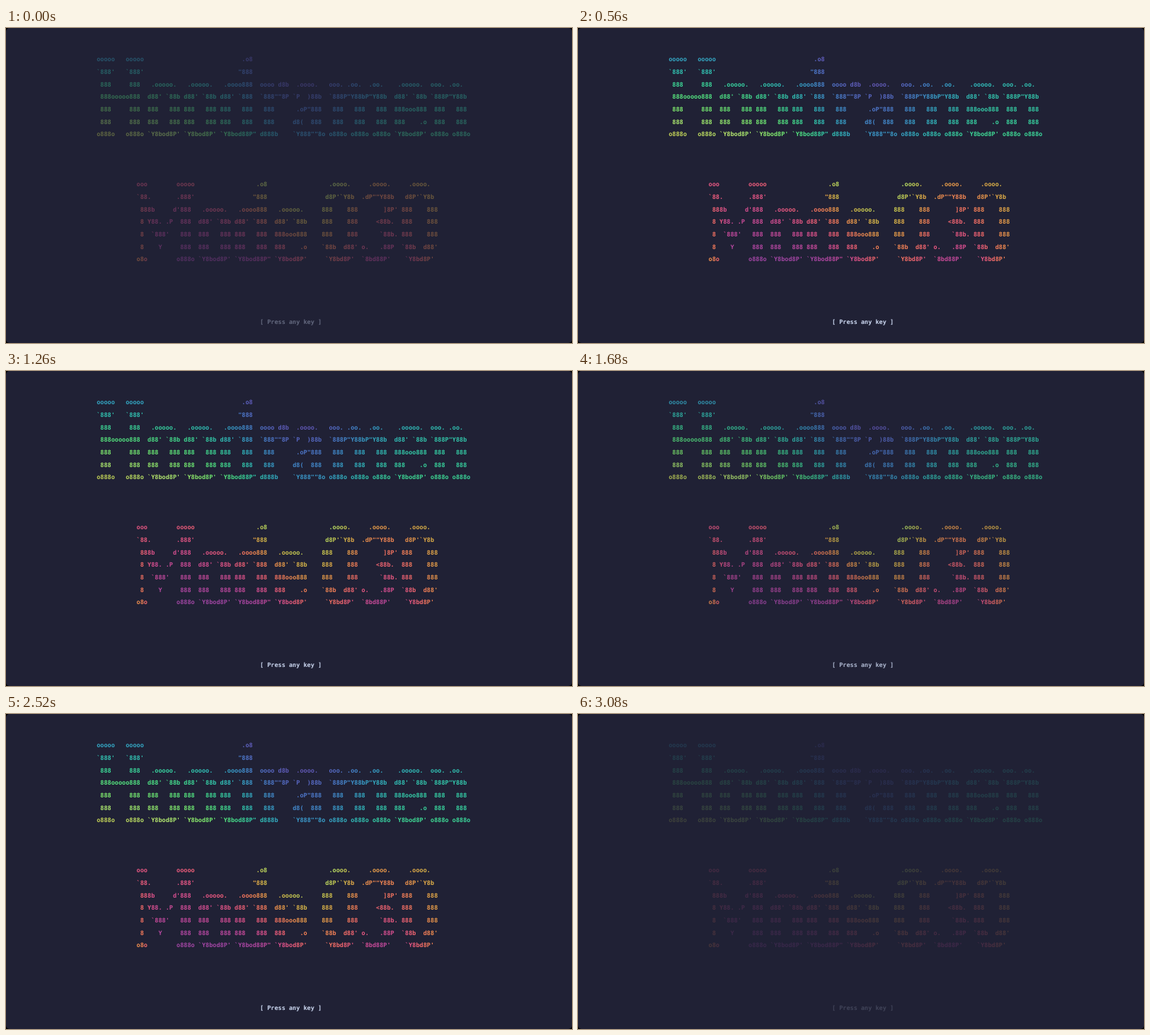
An HTML page that plays this animation: 800x446 px, repeating every 3.15 s.

```html
<!DOCTYPE html>
<html lang="en">
<head>
<meta charset="utf-8">
<title>Title screen</title>
<style>
  html, body { margin: 0; width: 100%; height: 100%; overflow: hidden; background: #000; }
  svg { display: block; width: 800px; height: 446px; background: #202135; border-radius: 5px; }
  text {
    font: bold 8.52px "DejaVu Sans Mono", monospace;
    text-rendering: geometricPrecision;
    white-space: pre;
  }
</style>
</head>
<body>
<svg viewBox="0 0 800 446"><g id="screen"></g></svg>
<script>
const CELL = 800 / 156, ROW = 17.69, TOP = 47.3;
const screen = document.getElementById('screen');

// Banner letters: rows split by "|", "~" stands for a backtick.
const GLYPHS = {
  H: `ooooo   ooooo|~888'   ~888'| 888     888| 888ooooo888| 888     888| 888     888|o888o   o888o`,
  M: `ooo        ooooo|~88.       .888'| 888b     d'888| 8 Y88. .P  888| 8  ~888'   888| 8    Y     888|o8o        o888o`,
  a: `|| .oooo.|~P  )88b| .oP"888|d8(  888|~Y888""8o`,
  d: `      .o8|     "888| .oooo888|d88' ~888|888   888|888   888|~Y8bod88P"`,
  e: `|| .ooooo.|d88' ~88b|888ooo888|888    .o|~Y8bod8P'`,
  m: `||ooo. .oo.  .oo.|~888P"Y88bP"Y88b| 888   888   888| 888   888   888|o888o o888o o888o`,
  n: `||ooo. .oo.|~888P"Y88b| 888   888| 888   888|o888o o888o`,
  o: `|| .ooooo.|d88' ~88b|888   888|888   888|~Y8bod8P'`,
  r: `||oooo d8b|~888""8P| 888| 888|d888b`,
  0: `  .oooo.| d8P'~Y8b|888    888|888    888|888    888|~88b  d88'| ~Y8bd8P'`,
  3: `  .oooo.|.dP""Y88b|      ]8P'|    <88b.|     ~88b.|o.   .88P|~8bd88P'`,
  ' ': '  '
};

const mix = (a, b, k) => a + (b - a) * k;
const bump = (u, center, width) => Math.exp(-(((u - center) / width) ** 2));

// Rainbow position across a banner: u runs left to right, v top to bottom.
function coolTone(u, v) {
  return mix(mix(.79, .45, v), mix(.76, .69, v), u) + .24 * bump(u, .53, .2);
}

function warmTone(u, v) {
  const top = .2 + .35 * bump(u, .53, .22) + .2 * bump(u, 1, .2);
  const bottom = .08 + .25 * bump(u, 0, .04) + .2 * bump(u, .6, .15) + .25 * bump(u, 1, .12);
  return mix(top, bottom, v);
}

// Softened cubehelix rainbow, t from 0 to 1.
function rainbow(t) {
  const d = Math.abs(t - .5), l = .8 - .9 * d, a = (1.2 - 1.2 * d) * l * (1 - l);
  const h = (360 * t + 20) * Math.PI / 180, c = Math.cos(h), s = Math.sin(h);
  const rgb = [-.149 * c + 1.783 * s, -.292 * c - .906 * s, 1.973 * c];
  return `rgb(${rgb.map(v => Math.round(255 * Math.max(0, Math.min(1, l + a * v))))})`;
}

function write(str, col, row, fill) {
  const el = document.createElementNS('http://www.w3.org/2000/svg', 'text');
  el.setAttribute('x', col * CELL);
  el.setAttribute('y', TOP + row * ROW);
  el.setAttribute('fill', fill);
  el.textContent = str;
  screen.append(el);
}

// Sets a word in banner letters, one blank column after each.
function banner(word, col, row, tone) {
  const lines = Array(7).fill('');
  for (const letter of word) {
    const rows = GLYPHS[letter].replaceAll('~', '`').split('|');
    const width = Math.max(...rows.map(r => r.length)) + 1;
    lines.forEach((line, i) => lines[i] = line + (rows[i] || '').padEnd(width));
  }
  lines.forEach((line, y) => [...line].forEach((ch, x) => {
    if (ch !== ' ') write(ch, col + x, row + y, rainbow(tone(x / line.length, y / 6)));
  }));
}

banner('Hoodramen', 25, 0, coolTone);
banner('Mode 030', 36, 10, warmTone);
write('[ Press any key ]', 70, 21, '#cdd9f2');

// Brightness dips to black once per pulse and ramps evenly on both sides.
const STEP = 70, PULSE = 1050, DARK = 915, RAMP = 350;

function draw() {
  const time = Math.floor(performance.now() / STEP) * STEP % PULSE;
  const gap = Math.abs(time - DARK);
  screen.setAttribute('opacity', Math.min(1, Math.min(gap, PULSE - gap) / RAMP));
  requestAnimationFrame(draw);
}
draw();
</script>
</body>
</html>
```
